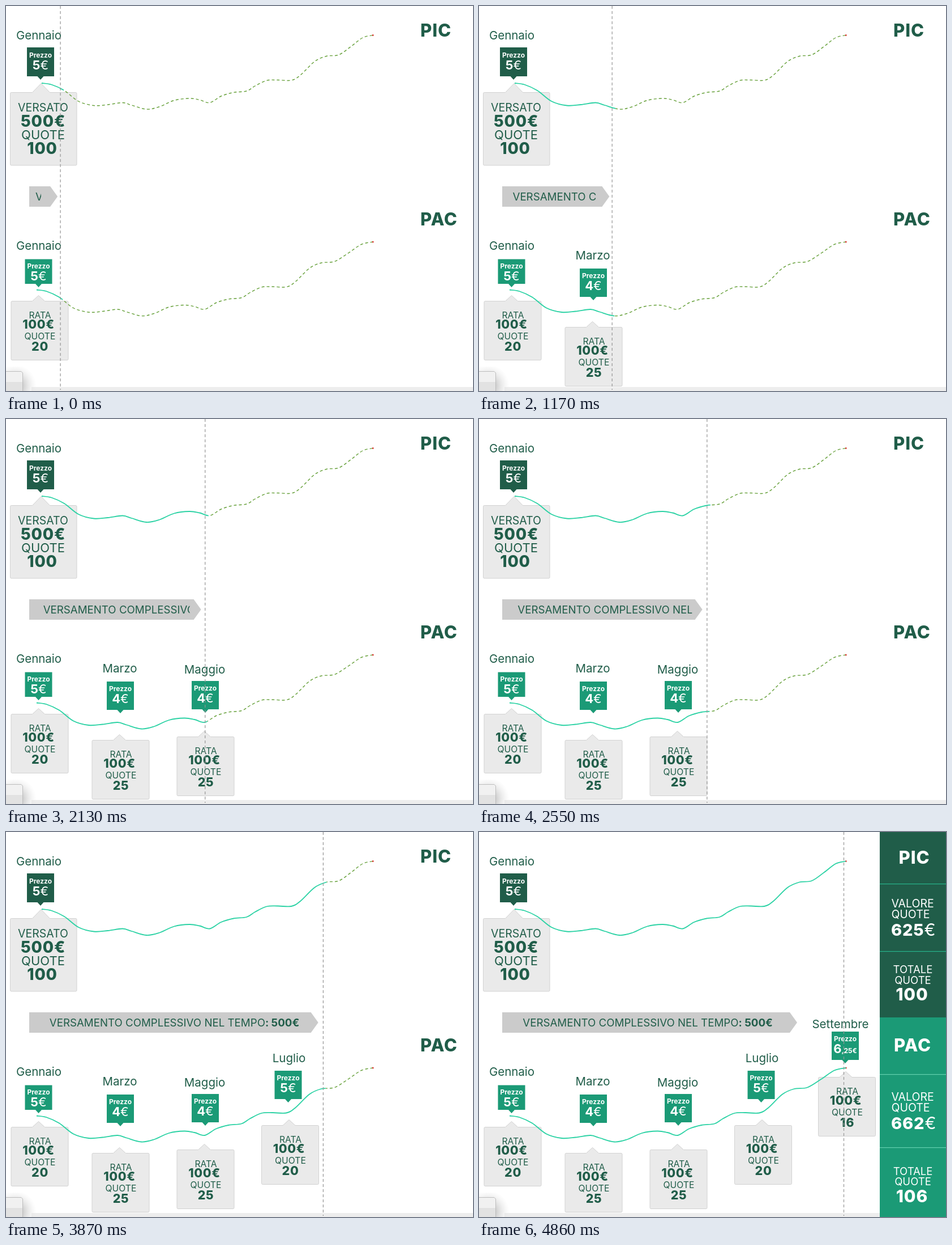
An HTML page with a canvas for the animation above (4.89 s loop, 825 by 679 pixels).

```html
<!DOCTYPE html>
<html lang="it">
<head>
<meta charset="utf-8">
<style>
  html, body { margin: 0; width: 100%; height: 100%; overflow: hidden; background: #fff; }
  canvas { display: block; }
</style>
</head>
<body>
<canvas id="stage" width="825" height="679"></canvas>
<script>
const ctx = document.getElementById('stage').getContext('2d');
const W = 825, H = 679, LOOP = 4890;
const DARK = '#205d49', GREEN = '#1b9a76', TEAL = '#2bd2a4';
const BOOK = 400, BOLD = 700, HEAVY = 800;

const clamp = v => Math.max(0, Math.min(1, v));
const outCubic = p => 1 - (1 - p) ** 3;
const outBack = (p, s = 2.1) => 1 + (s + 1) * (p - 1) ** 3 + s * (p - 1) ** 2;

const curve = [
  [63, 136], [80, 138.5], [103, 149], [128, 168], [155, 175.5], [180, 174], [206, 170.5],
  [222, 175], [248, 182], [270, 178], [297, 166.5], [324, 163], [342, 165.5], [360, 170.5],
  [380, 159], [402, 152.5], [425, 150], [440, 141], [460, 131.5], [480, 130.5], [504, 131],
  [520, 122], [545, 98], [566, 88.5], [588, 86], [610, 71], [630, 56], [648, 51.5]
];
const lowerCurve = curve.map(([x, y]) => [x - 9 * clamp((648 - x) / 70), y + 364.5]);

// Left edge and top of card; badge centre, top and height; label position; start time
const months = [
  { name: 'Gennaio', quote: '20', price: ['5', '€'], card: [9, 520], badge: [57.5, 446.5, 43.5], label: [58, 430], start: -1000 },
  { name: 'Marzo', quote: '25', price: ['4', '€'], card: [152, 566], badge: [202, 463, 50], label: [201, 447], start: 330 },
  { name: 'Maggio', quote: '25', price: ['4', '€'], card: [302, 560], badge: [352, 462, 50], label: [351, 449], start: 1580 },
  { name: 'Luglio', quote: '20', price: ['5', '€'], card: [451.5, 517], badge: [498.5, 421, 50], label: [500, 406], start: 2820 },
  { name: 'Settembre', quote: '16', price: ['6', ',25€'], card: [599.5, 432], badge: [647, 352, 50], label: [638.5, 346], start: 4060 }
];

function setFont(size, weight) {
  ctx.font = `${weight} ${size}px Inter, sans-serif`;
  ctx.letterSpacing = weight === HEAVY ? size * 0.03 + 'px' : '0px';
}

function text(str, x, y, size, weight, color = DARK, align = 'center') {
  setFont(size, weight);
  ctx.fillStyle = color;
  ctx.textAlign = align;
  ctx.fillText(str, x, y);
}

// Draws [string, size, weight] runs one after another
function runs(parts, x, y, color, centred) {
  const widths = parts.map(([str, size, weight]) => {
    setFont(size, weight);
    return ctx.measureText(str).width;
  });
  if (centred) x -= widths.reduce((a, b) => a + b) / 2;
  parts.forEach(([str, size, weight], i) => {
    text(str, x, y, size, weight, color, 'left');
    x += widths[i];
  });
}

function polygon(points, fill, stroke) {
  ctx.beginPath();
  points.forEach(([x, y]) => ctx.lineTo(x, y));
  ctx.closePath();
  ctx.fillStyle = fill;
  ctx.fill();
  if (stroke) {
    ctx.strokeStyle = stroke;
    ctx.lineWidth = 1;
    ctx.stroke();
  }
}

function bubble(x, y, w, h, tip, tipHalf, tipHeight) {
  ctx.beginPath();
  ctx.moveTo(x + 2, y);
  ctx.lineTo(tip - tipHalf, y);
  ctx.lineTo(tip, y - tipHeight);
  ctx.lineTo(tip + tipHalf, y);
  ctx.arcTo(x + w, y, x + w, y + h, 2);
  ctx.arcTo(x + w, y + h, x, y + h, 2);
  ctx.arcTo(x, y + h, x, y, 2);
  ctx.arcTo(x, y, x + w, y, 2);
  ctx.closePath();
  ctx.fillStyle = '#eaeaea';
  ctx.fill();
  ctx.strokeStyle = '#d2d2d2';
  ctx.lineWidth = 1;
  ctx.stroke();
}

function badge(cx, y, h, price, color, shift = 0) {
  const bottom = y + h;
  polygon([[cx - 24, y], [cx + 24, y], [cx + 24, bottom], [cx + 5.5, bottom],
    [cx, bottom + 6], [cx - 5.5, bottom], [cx - 24, bottom]], color);
  text('Prezzo', cx, y + 16.5 + shift, 12, BOLD, '#fff');
  const [whole, rest] = price;
  runs([[whole, 22, BOLD], rest === '€' ? [rest, 22, BOOK] : [rest, 12, BOLD]],
    cx, y + 37.5 + shift, '#fff', true);
}

function month(m, t) {
  const p = clamp((t - m.start) / 500);
  const rise = 40 * (1 - outCubic(p));
  ctx.globalAlpha = clamp((t - m.start + 120) / 250);
  text(m.name, ...m.label, 20.5, BOOK);
  ctx.globalAlpha = clamp(p * 2);
  badge(m.badge[0], m.badge[1] + rise, m.badge[2], m.price, GREEN);
  ctx.globalAlpha = clamp(p * 1.6);
  const [x, top] = m.card, y = top + rise;
  bubble(x, y + 0.5, 101, 104, x + 48.5, 11, 10);
  text('RATA', x + 51, y + 30.5, 15.7, BOOK);
  text('100€', x + 48.5, y + 49, 21.5, HEAVY);
  text('QUOTE', x + 51, y + 68, 15.7, BOOK);
  text(m.quote, x + 51, y + 88, 21.5, HEAVY);
  ctx.globalAlpha = 1;
}

function lumpSum() {
  text('Gennaio', 58, 59, 20.5, BOOK);
  badge(61, 73, 51, ['5', '€'], DARK, 1);
  bubble(7.5, 152.5, 117.5, 128.5, 62, 15.5, 16);
  text('VERSATO', 65.5, 186, 19.5, BOOK);
  text('500€', 65.5, 213, 28, HEAVY);
  text('QUOTE', 65.5, 235, 22, BOOK);
  text('100', 64, 261, 28, HEAVY);
}

function trace(points) {
  ctx.beginPath();
  ctx.moveTo(...points[0]);
  for (let i = 0; i < points.length - 1; i++) {
    const b = points[i], c = points[i + 1];
    const a = points[i - 1] || b, d = points[i + 2] || c;
    ctx.bezierCurveTo(b[0] + (c[0] - a[0]) / 6, b[1] + (c[1] - a[1]) / 6,
      c[0] - (d[0] - b[0]) / 6, c[1] - (d[1] - b[1]) / 6, ...c);
  }
  ctx.stroke();
}

function clipped(x, y, w, h, draw) {
  ctx.save();
  ctx.beginPath();
  ctx.rect(x, y, w, h);
  ctx.clip();
  draw();
  ctx.restore();
}

function chart(points, head) {
  clipped(head, 0, W, H, () => {
    ctx.strokeStyle = '#66a03a';
    ctx.lineWidth = 1.4;
    ctx.setLineDash([5, 4]);
    trace(points);
  });
  const [x, y] = points[points.length - 1];
  ctx.fillStyle = '#d8392f';
  ctx.fillRect(x - 1, y - 1.2, 2.5, 2.5);
  clipped(0, 0, head, H, () => {
    ctx.strokeStyle = TEAL;
    ctx.lineWidth = 1.8;
    trace(points);
  });
}

function arrow(t) {
  const grow = Math.min(t, 3958);
  const tip = 91 + 0.119 * grow;
  polygon([[41, 318], [tip - 13, 318], [tip, 336], [tip - 13, 354], [41, 354]], '#cbcbcb');
  clipped(41, 318, 21 + 0.1232 * grow, 36, () =>
    runs([['VERSAMENTO COMPLESSIVO NEL TEMPO', 18.7, BOOK], [': 500€', 18.7, BOLD]],
      52 + 0.0064 * grow, 342.5, DARK));
}

function floor() {
  ctx.fillStyle = '#ededed';
  ctx.fillRect(45, 672, W, 7);
  const glow = ctx.createRadialGradient(16, 670, 14, 16, 670, 38);
  glow.addColorStop(0, '#cfcfcf');
  glow.addColorStop(1, 'rgba(235,235,235,0)');
  ctx.fillStyle = glow;
  ctx.fillRect(0, 636, 70, 43);
  polygon([[-2, 644.5], [27, 644.5], [29.5, 647], [29.5, 681], [-2, 681]], '#f1f1f1', '#bdbdbd');
  ctx.fillStyle = '#e2e2e2';
  ctx.fillRect(0, 663, 29, 16);
}

function panel(x, top, bottom, color, rule, rows, title, value, total) {
  const white = '#fff';
  ctx.fillStyle = color;
  ctx.fillRect(x, top, 120, bottom - top);
  ctx.fillStyle = rule;
  rows.forEach(y => ctx.fillRect(x, y, 120, 1.2));
  const [first, second] = rows;
  text(title, x + (top ? 58 : 61), top + (top ? 60 : 56), 31, HEAVY, white);
  const v = first + (top ? 47 : 42);
  text('VALORE', x + 20.5, v, 19.5, BOOK, white, 'left');
  text('QUOTE', x + 20.5, v + 19, 19.5, BOOK, white, 'left');
  runs([[value, 29, HEAVY], ['€', 30, BOOK]], x + 20, v + 49.5, white);
  const q = second + (top ? 48.5 : 39);
  text('TOTALE', x + 58.5, q, 18.5, BOOK, white);
  text('QUOTE', x + 58.5, q + 18.5, 18.5, BOOK, white);
  text(total, x + 57, q + 48, 30, HEAVY, white);
}

const slide = (t, start) => 828 - 120 * outBack(clamp((t - start) / 650));

// Steady sweep, slightly slower at both ends
const sweep = t => Math.min(644.5, 96 + 0.1199 * t - 1.3 * Math.sin(t * Math.PI / 2000));

function render(t) {
  ctx.fillStyle = '#fff';
  ctx.fillRect(0, 0, W, H);
  floor();
  text('PIC', 732, 54, 31, HEAVY, DARK, 'left');
  text('PAC', 732, 387, 31, HEAVY, DARK, 'left');
  lumpSum();
  arrow(t);
  months.forEach(m => t > m.start - 120 && month(m, t));

  const line = sweep(t);
  chart(curve, line + 6);
  chart(lowerCurve, line + 4);

  ctx.save();
  ctx.setLineDash([5, 4]);
  ctx.strokeStyle = '#959595';
  ctx.lineWidth = 1.2;
  ctx.beginPath();
  ctx.moveTo(line, 0);
  ctx.lineTo(line, 677);
  ctx.stroke();
  ctx.restore();

  panel(slide(t, 4220), 0, 327, DARK, '#27b48c', [91, 210], 'PIC', '625', '100');
  panel(slide(t, 4000), 327, H, GREEN, '#62cfae', [427, 556], 'PAC', '662', '106');
}

function tick() {
  render(performance.now() % LOOP);
  requestAnimationFrame(tick);
}
tick();
</script>
</body>
</html>
```
